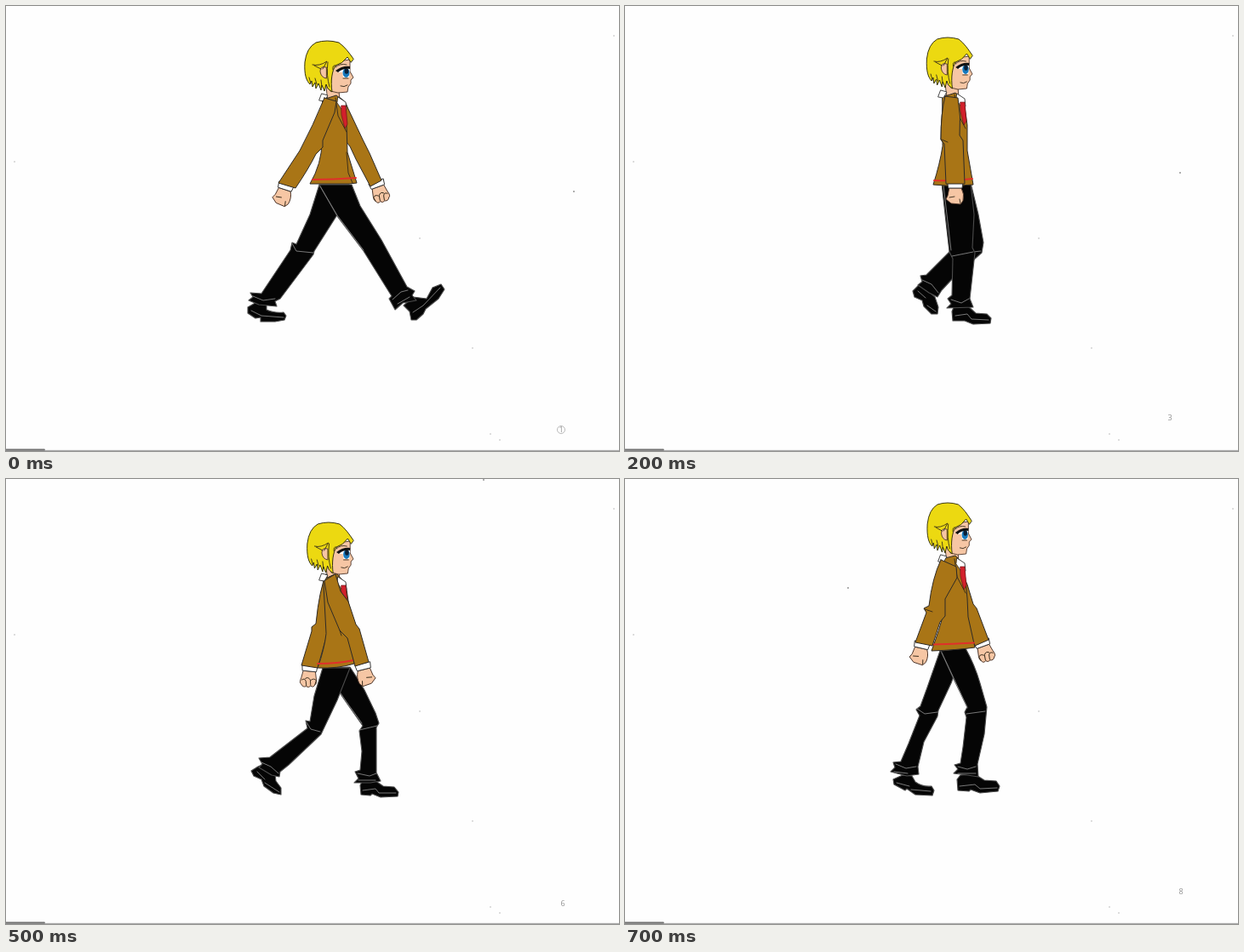
An HTML page for the animation above (0.8 s loop, 720 by 523 pixels).

```html
<!DOCTYPE html>
<html lang="en">
<head>
<meta charset="utf-8">
<title>Walk cycle</title>
<style>
  html, body { margin: 0; width: 100%; height: 100%; overflow: hidden; background: #fefefe; }
  svg { display: block; width: 100vw; height: 100vh; }
  .step { visibility: hidden; animation: show 800ms step-end infinite; }
  @keyframes show { 0% { visibility: visible; } 12.5%, 100% { visibility: hidden; } }
  path, ellipse { stroke-linejoin: round; stroke-linecap: round; }
  .coat { fill: #a97516; stroke: #2e2a26; stroke-width: 1; }
  .skin { fill: #f6c6a4; stroke: #4a3328; stroke-width: .9; }
  .hair { fill: #ecd911; stroke: #33300c; stroke-width: 1; }
  .white { fill: #fff; stroke: #333; stroke-width: .9; }
  .red { fill: #d2202b; stroke: #6d1518; stroke-width: .7; }
  .leg { fill: #050505; stroke: #4c4c4c; stroke-width: 1.1; }
  .fold { fill: none; stroke: #858585; stroke-width: .9; }
  .line { fill: none; stroke: #33291a; stroke-width: .9; }
  .hem { fill: none; stroke: #e0302a; stroke-width: 1.8; }
  .mark { fill: none; stroke: #aaa; stroke-width: .8; }
  .num { font: 9px "Open Sans", sans-serif; fill: #909090; text-anchor: middle; }
</style>
</head>
<body>
<svg viewBox="0 0 720 523" preserveAspectRatio="none">
  <defs>
    <g id="head">
      <path class="skin" d="M383 66L404 63L404 77L408 84L405 87L405 91L402 95L401 101L390 102L381 100Z"/>
      <path class="hair" d="M408 62C403 55 398 48 391 43Q377 39 364 43Q353 49 351 66C350 81 353 88 357 92L359 88L360 95L363 90L364 97L367 91L370 99L371 93L374 100L376 92L378 97L383 101C381 88 383 76 387 70Q395 68 401 60L405 66Z"/>
      <path class="skin" d="M376 72Q369 70 369 77Q370 84 376 85Z"/>
      <path class="line" d="M360 69Q368 71 377 65L372 74M362 70L370 74M378 66Q376 82 380 95M387 70Q383 69 384 75M358 91L356 84M365 92L363 85M371 95L370 87"/>
      <path d="M390 78Q395 71 404 72L403 84L396 84L395 78Z" fill="#fff"/>
      <ellipse cx="399.5" cy="78.5" rx="4" ry="5.4" fill="#1679bd"/>
      <ellipse cx="400" cy="76.5" rx="2.4" ry="3.2" fill="#0a2038"/>
      <path d="M387 76Q395 70 404 71L404 74Q396 73 390 78Z" fill="#111"/>
      <path class="line" d="M387 72Q392 67 400 69M393 94Q397 96 401 93M396 85L402 85"/>
    </g>
    <g id="neck">
      <path class="skin" d="M376 92L391 98L392 114L378 109Z"/>
    </g>
    <g id="front">
      <path class="white" d="M371 103L378 105L374 112L368 111Z"/>
      <path class="white" d="M390 107L399 113L400 122L396 124L389 114Z"/>
      <path class="red" d="M394 117L399 117L401 139L398 144L394 128Z"/>
      <path class="line" d="M387 108L390 129L400 148"/>
    </g>
    <g id="cuff">
      <path class="white" d="M-9 -2L9 -2L8 5L-8 5Z"/>
    </g>
    <g id="palm">
      <path class="skin" d="M-7 5L7 5Q11 12 9 20L6 24L-5 23L-11 18L-9 14Z"/>
      <path class="line" d="M-7 16L-1 15M6 23L5 18"/>
      <use href="#cuff"/>
    </g>
    <g id="fist">
      <path class="skin" d="M-7 5L7 5L9 14Q10 19 8 20Q7 24 3 22Q1 25 -2 23Q-6 25 -8 21Q-11 20 -9 14Z"/>
      <path class="line" d="M-4 14Q-1 11 2 15L3 21M-8 16Q-5 13 -3 17L-2 22M3 15Q6 12 9 15L8 20"/>
      <use href="#cuff"/>
    </g>
  </defs>
  <g id="paper" fill="#a5a5a5">
    <path d="M0 522.400H720" stroke="#a2a2a2" stroke-width="1"/>
    <path d="M0 521.500H45" stroke="#727272" stroke-width="1.8"/>
  </g>
  <g id="walk"></g>
</svg>
<script>
// Poses: contact, down, passing, up. Limbs are named by their place on screen.
const poses = [
  {
    torso: 'M372 110L388 105L398 113L400 140L401 172L412 208L403 209L357 209Q371 185 371 160Z',
    hem: 'M360 204Q385 204 411 202',
    left: 'M374 108L388 112L386 125L372 158L372 166L364 174Q355 192 340 214L320 208L345 170Q361 140 374 108Z',
    right: 'M386 105Q398 108 402 121L419 157L427 173L441 205L428 212L411 180L404 165L388 145L373 116Z',
    tuck: { left: 'M365 173L372 166', right: 'M404 165L411 179' },
    hands: [[329, 211, 18], [435, 208, -20]],
    back: 'M368 210L403 210L388 247L362 288L361 292L322 344L316 347L318 353L297 351L285 346L290 342L287 337L300 338L334 287L336 278L341 280L357 245Z',
    backShoe: 'M284 354L291 350L294 346L306 349L306 357Q314 361 326 360L329 364L327 369L316 371L299 371L299 366L293 367L284 361Z',
    backFold: 'M336 279L341 288L361 290M290 341L302 346L316 344M288 358L300 364L326 366',
    fore: 'M368 210L406 210L416 235L441 275L471 330L480 335L477 340L482 346L466 349L457 357L450 344L453 341L420 288L389 247Z',
    foreShoe: 'M467 352L478 342L494 344L501 331L511 327L515 333L508 344L493 356L490 362L482 369L476 369L474 359Z',
    foreFold: 'M369 212L389 246L420 287M454 345L464 336L472 334M460 350L474 342M478 360L490 352L510 331'
  },
  {
    torso: 'M373 118L388 111L399 123L403 150L402 182L409 217Q390 223 366 222Q374 200 376 182Z',
    hem: 'M366 217Q390 217 408 213',
    left: 'M376 112L390 117L391 137L379 178L375 190L366 222L347 219L359 179L359 174L364 170Q368 130 376 112Z',
    right: 'M387 112L393 132L402 144L411 171L415 176L426 215L410 220L401 187L392 178L378 145L374 120Z',
    tuck: { left: 'M359 176L366 178', right: 'M392 178L394 184' },
    hands: [[357, 221, 6], [419, 219, -14]],
    back: 'M372 222L404 222L389 260L370 300L332 336L322 344L321 350L312 348L297 339L301 335L297 328L310 327L354 293L352 284L357 285L362 255Z',
    backShoe: 'M288 343L296 338L303 335L316 347L317 355L323 363L323 371L314 369L303 361L300 353L291 349Z',
    backFold: 'M353 286L358 294L369 297M300 333L311 338L320 346M295 344L304 353M304 357L321 368',
    fore: 'M372 222L404 221Q413 234 421 248L434 275L438 287L435 292L435 345L440 355L428 357L409 357L414 352L410 344L416 342L418 320L415 296L419 290L400 263Z',
    foreShoe: 'M416 360L419 354L433 354L443 361L456 362L461 368L460 373L440 374L430 370L428 372L417 371Z',
    foreFold: 'M374 224L400 262L418 287M415 295L436 290M413 346L427 349L435 346M414 354L434 354M419 366L434 364L438 369L458 369'
  },
  {
    torso: 'M373 107L388 102L398 111L402 140L402 170L409 210Q385 213 362 210Q370 185 373 165Z',
    hem: 'M363 205Q385 206 408 203',
    left: 'M376 106L391 108Q395 130 393 152L397 158L399 209L377 209L375 162L371 157Q371 125 376 106Z',
    right: 'M376 106L391 108Q395 130 393 152L397 158L399 209L377 209L375 162L371 157Q371 125 376 106Z',
    tuck: { left: 'M372 157L379 160', right: 'M372 157L379 160' },
    hands: [[388, 209, 0], [388, 209, 0]],
    back: 'M374 208L406 208L415 245L421 278L419 290L386 319L372 334L367 342L357 337L344 328L349 324L347 317L354 316L384 286L380 245Z',
    backShoe: 'M338 335L345 328L354 333L364 342L368 354L367 362L360 362L351 353L349 346L340 342Z',
    backFold: 'M384 284L390 291L418 288M349 322L360 327L368 337M344 335L353 343M355 352L365 359',
    fore: 'M372 208L406 208L410 245L408 284L411 290L405 344L409 354L378 355L383 350L379 344L384 340L385 297L381 289L376 245Z',
    foreShoe: 'M384 359L387 352L402 352L412 361L425 362L430 367L429 373L409 374L399 370L385 370Z',
    foreFold: 'M374 210L378 245L383 287M384 294L409 289M383 345L395 349L404 344M388 364L402 362L407 368L427 369'
  },
  {
    torso: 'M372 94L388 90L398 100L402 140L403 162L411 198Q390 201 360 202Q370 175 374 158Z',
    hem: 'M361 194.500Q385 194 410 192.500',
    left: 'M371 95L389 103L390 116L376 141L376 161L370 168L361 196L341 192L354 157L351 152L357 149Q361 116 371 95Z',
    right: 'M384 91L392 102L402 124L409 147L413 152L427 189L411 196L394 157L376 130L374 98Z',
    tuck: { left: 'M352 153L361 156', right: 'M396 157L411 153' },
    hands: [[349, 194, 13], [419, 192, -20]],
    back: 'M370 202L398 200L383 240L368 272L367 279L351 309L344 338L345 347L331 349L312 344L317 339L315 333L324 332L333 311L346 278L342 271L347 267L355 245Z',
    backShoe: 'M315 353L326 348L337 349L341 356Q349 362 360 361L363 366L361 372L341 371L331 364L329 366L316 359Z',
    backFold: 'M343 270L352 276L367 274M318 335L330 340L342 338M316 344L332 346M319 357L334 361M336 365L359 367',
    fore: 'M371 202L400 199Q411 219 417 240L425 268L422 300L414 335L415 350L402 348L386 346L391 341L387 336L394 334L397 315L401 280L399 274L402 268L386 235Z',
    foreShoe: 'M390 353L394 348L411 347L422 354L436 355L440 361L438 367L417 369L406 365L404 367L391 366Z',
    foreFold: 'M372 204L387 236L402 269M401 276L423 273M391 338L402 341L412 338M391 346L412 346M393 361L411 359L417 364L437 363'
  }
];

// Head: shift x, y and width; chest: shift x, y; page mark: x, y, ring; dust: x, y
const steps = [
  { head: [0, 0, 1],      chest: [0, 0],    mark: [652, 498, 1], dust: [667, 218] },
  { head: [0, 10, .9],    chest: [2, 9],    mark: [627, 478, 1], dust: [653, 211] },
  { head: [0, -4, .94],   chest: [0, -4],   mark: [640, 484, 0], dust: [652, 196] },
  { head: [-2, -17, .88], chest: [0, -18],  mark: [587, 481, 0], dust: [651, 181] },
  { head: [1, 0, 1],      chest: [-1, 0],   mark: [648, 465, 1], dust: [561, 1] },
  { head: [0, 10, .95],   chest: [0, 8],    mark: [654, 499, 0], dust: [561, 1] },
  { head: [0, -4, .94],   chest: [0, -4],   mark: [650, 490, 0], dust: [258, 122] },
  { head: [-1, -13, .91], chest: [0, -14],  mark: [653, 485, 0], dust: [262, 128] }
];

const path = (cls, d) => `<path class="${cls}" d="${d}"/>`;
const use = (id, transform) => `<use href="#${id}" transform="${transform}"/>`;
const dot = ([x, y], r = .9) => `<circle cx="${x}" cy="${y}" r="${r}"/>`;

const leg = (p, side) =>
  path('leg', p[side + 'Shoe']) + path('leg', p[side]) + path('fold', p[side + 'Fold']);

function arm(p, side, hand) {
  const right = side === 'right';
  const [x, y, turn] = p.hands[+right];
  const flip = right ? -1 : 1;
  return use(hand, `translate(${x} ${y}) rotate(${turn}) scale(${flip} 1)`) + path('coat', p[side]);
}

function figure(step, i) {
  const p = poses[i % 4];
  const open = i < 3 || i === 7;
  const [nearArm, farArm] = open ? ['left', 'right'] : ['right', 'left'];
  const [nearLeg, farLeg] = open ? ['fore', 'back'] : ['back', 'fore'];
  const [hx, hy, w] = step.head;
  const chest = `translate(${step.chest})`;
  const vent = i === 0 ? path('line', 'M400 172L402 196L407 208') : '';
  return arm(p, farArm, 'fist') + leg(p, farLeg) + leg(p, nearLeg)
    + use('neck', chest) + path('coat', p.torso) + vent + path('hem', p.hem)
    + use('front', chest) + arm(p, nearArm, 'palm') + path('line', p.tuck[nearArm])
    + use('head', `matrix(${w} 0 0 1 ${408 * (1 - w) + hx} ${hy})`);
}

function note([x, y, ring], i) {
  const circle = ring ? `<circle class="mark" cx="${x}" cy="${y}" r="4.500"/>` : '';
  return circle + `<text class="num" x="${x}" y="${y + 3}">${i + 1}</text>`;
}

document.getElementById('paper').innerHTML +=
  [[714, 35], [10, 183], [486, 273], [548, 402], [569, 503], [580, 510]].map(p => dot(p, .7)).join('');

document.getElementById('walk').innerHTML = steps.map((s, i) =>
  `<g class="step" style="animation-delay:${i * 100 - 800}ms">${figure(s, i)}${note(s.mark, i)}<g fill="#888">${dot(s.dust)}</g></g>`
).join('');
</script>
</body>
</html>
```
